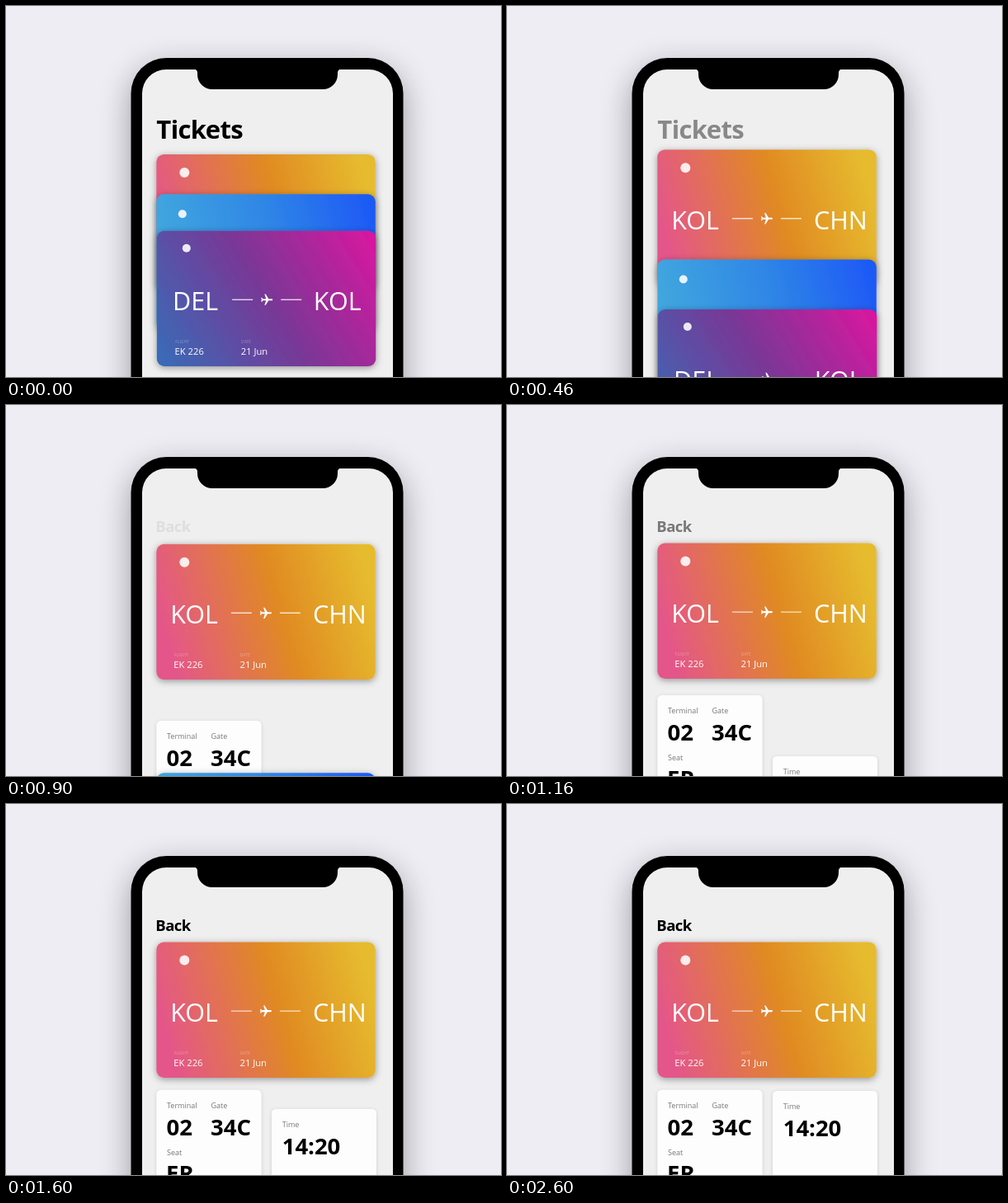
Animation, 600 px wide and 450 px high, one loop 2.63 s. Source, as an HTML page:

```html
<!DOCTYPE html>
<html lang="en">
<head>
<meta charset="utf-8">
<title>Tickets</title>
<style>
  html, body { margin: 0; width: 100%; height: 100%; overflow: hidden; background: #eeedf4; }
  svg { display: block; width: 100vw; height: 100vh; }
  text { font-family: "Open Sans", "Noto Sans", sans-serif; }
  .title { font-weight: 700; font-size: 31px; letter-spacing: -.02em; }
  .back { font-weight: 700; font-size: 18.5px; letter-spacing: -.03em; }
  .ticket { fill: #fff; }
  .city { font-size: 30.5px; }
  .value { font-size: 11.2px; }
  .tiny { font-size: 5px; opacity: .35; }
  .label { font-size: 9px; fill: #777; }
  .big { font-size: 27.5px; font-weight: 700; fill: #000; }
</style>
</head>
<body>
<svg viewBox="0 0 600 450">
  <defs>
    <linearGradient id="orange" gradientUnits="userSpaceOnUse" x1="10" y1="112" x2="256" y2="42">
      <stop offset="0" stop-color="#e4568a"/>
      <stop offset=".56" stop-color="#e08a22"/>
      <stop offset="1" stop-color="#e6bb2f"/>
    </linearGradient>
    <linearGradient id="blue" gradientUnits="userSpaceOnUse" x1="0" y1="112" x2="266" y2="46">
      <stop offset="0" stop-color="#43abdd"/>
      <stop offset=".55" stop-color="#2f86e6"/>
      <stop offset="1" stop-color="#1e5af6"/>
    </linearGradient>
    <linearGradient id="purple" gradientUnits="userSpaceOnUse" x1="0" y1="164" x2="266" y2="0">
      <stop offset="0" stop-color="#376db8"/>
      <stop offset=".5" stop-color="#783896"/>
      <stop offset="1" stop-color="#dd16a0"/>
    </linearGradient>
    <filter id="glow" x="-40%" y="-40%" width="180%" height="180%">
      <feGaussianBlur stdDeviation="19"/>
    </filter>
    <filter id="deep" x="-20%" y="-20%" width="140%" height="140%">
      <feDropShadow dx="0" dy="2" stdDeviation="4.5" flood-opacity=".38"/>
    </filter>
    <filter id="soft" x="-20%" y="-20%" width="140%" height="140%">
      <feDropShadow dx="0" dy="1" stdDeviation="2" flood-opacity=".16"/>
    </filter>
    <clipPath id="screen"><rect x="165" y="77" width="304" height="500" rx="29"/></clipPath>
    <g id="route">
      <path d="M-42 0H-17M17 0H42" stroke="#fff" stroke-width="1.4" opacity=".75"/>
      <path transform="rotate(90) scale(.7) translate(-11.5 -12)" fill="#fff"
        d="M21 16v-2l-8-5V3.5C13 2.67 12.33 2 11.5 2S10 2.67 10 3.5V9l-8 5v2l8-2.5V19l-2 1.5V22l3.5-1 3.5 1v-1.5L13 19v-5.5l8 2.5z"/>
    </g>
  </defs>

  <rect width="600" height="450" fill="#eeedf4"/>
  <rect x="151.5" y="75" width="330" height="600" rx="43" opacity=".35" filter="url(#glow)"/>
  <rect x="151.5" y="63" width="330" height="600" rx="43"/>
  <rect x="165" y="77" width="304" height="500" rx="29" fill="#efeff0"/>
  <path d="M228 76.5Q232 77 232 81V83A18 18 0 0 0 250 101H384A18 18 0 0 0 402 83V81Q402 77 406 76.5Z"/>

  <g clip-path="url(#screen)">
    <text id="title" class="title" x="182.3" y="161">Tickets</text>
    <text id="back" class="back" x="181.3" y="154">Back</text>
    <g id="stage"></g>
  </g>
</svg>
<script>
const LOOP = 2630;
const $ = id => document.getElementById(id);
const clamp = v => Math.max(0, Math.min(1, v));
const text = (cls, x, y, s) => `<text class="${cls}" x="${x}" y="${y}">${s}</text>`;

function panel(id, items) {
  return `<g id="${id}"><rect width="127" height="180" rx="5.5" fill="#fdfdfd" filter="url(#soft)"/>${items}</g>`;
}

function ticket(id, fill, mark, from, to, dx) {
  const [cx, cy, r] = mark;
  return `<g id="${id}" class="ticket">
    <rect width="265.5" height="164.3" rx="9" fill="url(#${fill})" filter="url(#deep)"/>
    <circle cx="${cx}" cy="${cy}" r="${r}" opacity=".88"/>
    ${text('city', from[1], 96.5, from[0])}${text('city', to[1], 96.5, to[0])}
    <use href="#route" x="${132.6 + dx}" y="83.5"/>
    ${text('tiny', 21.7 + dx, 136.5, 'FLIGHT')}${text('tiny', 101.5 + dx, 136.5, 'DATE')}
    ${text('value', 21 + dx, 150.4, 'EK 226')}${text('value', 101.2 + dx, 150.4, '21 Jun')}
  </g>`;
}

$('stage').innerHTML =
  panel('seat',
    text('label', 12.5, 22.3, 'Terminal') + text('label', 66, 22.3, 'Gate') +
    text('big', 12, 55, '02') + text('big', 65.5, 55, '34C') +
    text('label', 12.5, 79.3, 'Seat') + text('big', 11.5, 111, 'ER')) +
  panel('time', text('label', 12.7, 22.3, 'Time') + text('big', 12.7, 55, '14:20')) +
  ticket('first', 'orange', [34, 22, 6], ['KOL', 16.9], ['CHN', 189.8], 0) +
  ticket('second', 'blue', [31.5, 24, 5], ['KOL', 16.9], ['CHN', 189.8], 0) +
  ticket('third', 'purple', [36, 21, 5], ['DEL', 19.3], ['KOL', 190], .8);

const place = (id, x, y) => $(id).setAttribute('transform', `translate(${x} ${y.toFixed(2)})`);
const fade = (id, a) => $(id).setAttribute('opacity', a.toFixed(3));
// Decelerating slide that comes to rest at y when t reaches end
const settle = (t, y, end, k) => y + k * Math.max(0, end - t) ** 2;

function draw(t) {
  const drop = (t / 460) ** 1.51;
  fade('title', clamp(1 - t / 900) ** 1.18);
  fade('back', clamp((t - 860) / 610));
  place('first', 182.3, 179.9 - 12.3 * clamp(t / 1000));
  place('second', 182.3, 228.3 + 79 * drop);
  place('third', 182.8, 272.7 + 95 * drop);
  place('seat', 182.5, settle(t, 346.7, 1320, 2.07e-4));
  place('time', 322, settle(t, 348, 2098, 8.87e-5));
}

function tick() {
  draw(performance.now() % LOOP);
  requestAnimationFrame(tick);
}
draw(0);
requestAnimationFrame(tick);
</script>
</body>
</html>
```
